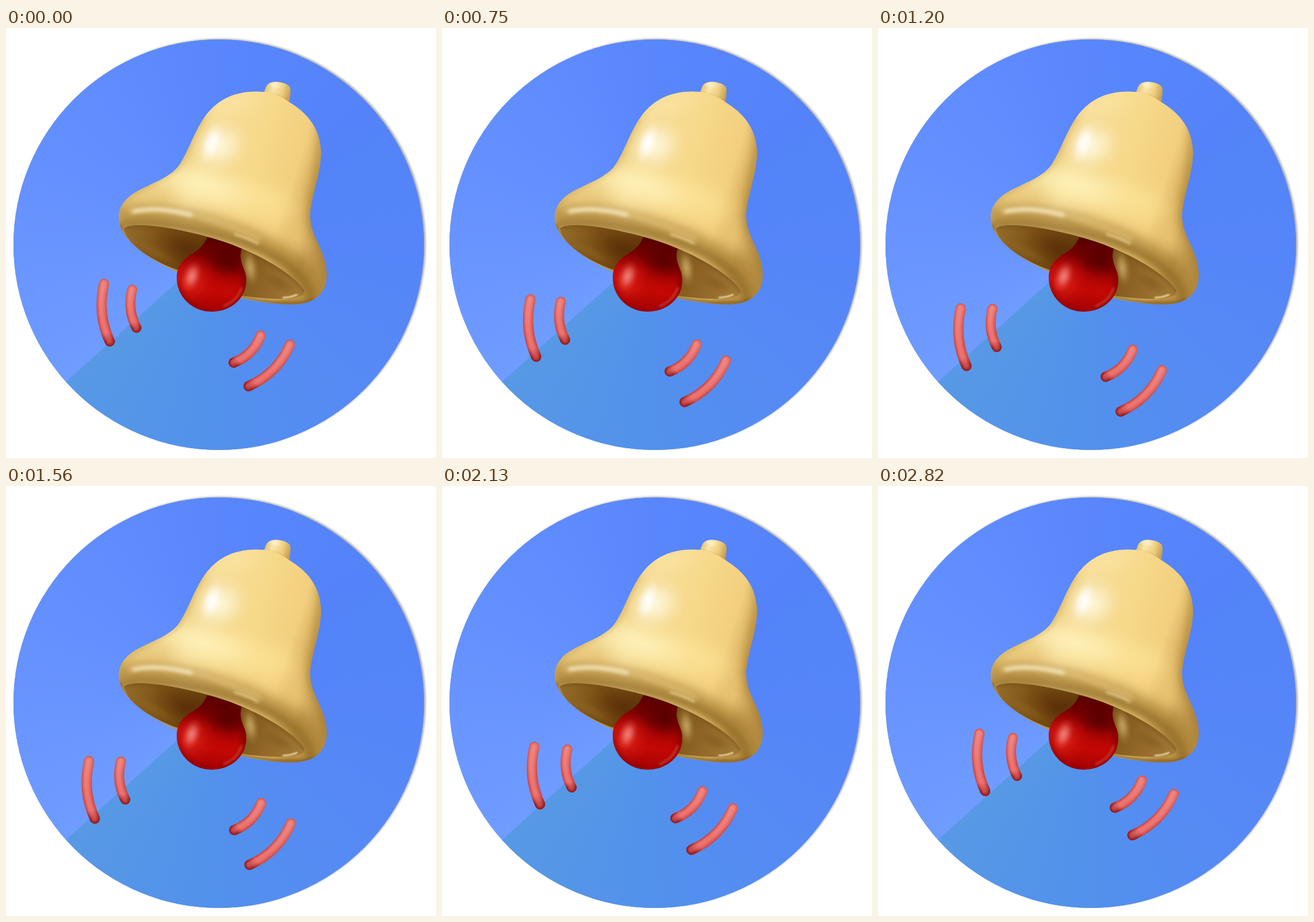
An HTML page with a canvas that plays this animation: 748x748 px, repeating every 2.85 s.

```html
<!DOCTYPE html>
<html lang="en">
<head>
<meta charset="utf-8">
<title>Ringing bell</title>
<style>
html, body { margin: 0; width: 100%; height: 100%; overflow: hidden; background: #fff; }
canvas { display: block; width: 748px; height: 748px; }
</style>
</head>
<body>
<canvas id="stage" width="748" height="748"></canvas>
<script>
const SIZE = 748, LOOP = 2850, STEP = 30;
const ctx = document.getElementById('stage').getContext('2d');
const scene = document.createElement('canvas');
scene.width = scene.height = SIZE;
const g = scene.getContext('2d');

const addStops = (grad, stops) => {
  stops.forEach(([at, color]) => grad.addColorStop(at, color));
  return grad;
};
const linear = (c, x0, y0, x1, y1, stops) =>
  addStops(c.createLinearGradient(x0, y0, x1, y1), stops);

// Soft elliptical spot that fades to nothing
function glow(x, y, rx, ry, deg, rgb, alpha) {
  g.save();
  g.translate(x, y);
  g.rotate(deg * Math.PI / 180);
  g.scale(rx, ry);
  g.fillStyle = addStops(g.createRadialGradient(0, 0, 0, 0, 0, 1), [
    [0, `rgba(${rgb},${alpha})`],
    [0.35, `rgba(${rgb},${alpha * 0.68})`],
    [0.7, `rgba(${rgb},${alpha * 0.2})`],
    [1, `rgba(${rgb},0)`]
  ]);
  g.fillRect(-1, -1, 2, 2);
  g.restore();
}

function softLine(d, width, color, blur) {
  g.save();
  g.filter = `blur(${blur}px)`;
  g.lineCap = 'round';
  g.lineWidth = width;
  g.strokeStyle = color;
  g.stroke(new Path2D(d));
  g.restore();
}

function clipped(path, draw) {
  g.save();
  g.clip(path);
  draw();
  g.restore();
}

function drawDisc() {
  g.fillStyle = '#fff';
  g.fillRect(0, 0, SIZE, SIZE);
  const disc = new Path2D();
  disc.arc(370, 377, 357, 0, 7);
  g.save();
  g.shadowColor = 'rgba(0,0,0,.32)';
  g.shadowBlur = 3.5;
  g.shadowOffsetX = 3;
  g.shadowOffsetY = -1.5;
  g.fillStyle = '#5585f9';
  g.fill(disc);
  g.restore();
  g.fillStyle = addStops(g.createConicGradient(Math.atan2(238, -265), 370, 377), [
    [0, '#6f9cff'], [0.12, '#6894ff'], [0.25, '#608dff'], [0.37, '#5986fc'],
    [0.5, '#5483f9'], [0.62, '#5585f9'], [0.75, '#568af4'],
    [0.87, '#5291ec'], [1, '#5799e4']
  ]);
  g.fill(disc);
}

function drawKnob() {
  const knob = new Path2D('M447 118 C452 105 452 97 462 94.5 C472 91.5 490 96 494 103 C497 110 493 120 493 134 Z');
  g.fillStyle = linear(g, 450, 105, 496, 118,
    [[0, '#e2c074'], [0.3, '#fbe5a8'], [0.65, '#efcf80'], [1, '#bf974a']]);
  g.fill(knob);
  clipped(knob, () => {
    glow(468, 99, 15, 8, 10, '255,247,215', 0.7);
    softLine('M448 117 Q472 114 494 134', 4, 'rgba(160,120,48,.45)', 2.5);
  });
}

function drawBody() {
  const body = new Path2D('M449 111 C400 107 365 124 342 160 C325 187 318 212 303 236 ' +
    'C290 257 262 267 240 278 C212 291 196 306 196 332 C197 362 236 397 297 424 L410 470 ' +
    'C445 478 475 481 500 481 C537 480 558 461 558 429 C557 385 530 367 529 327 ' +
    'C530 293 548 255 548 215 C546 173 524 148 493 129 C480 119 464 113 449 111 Z');
  g.fillStyle = linear(g, 310, 190, 556, 272,
    [[0, '#ebcc80'], [0.16, '#f6dd99'], [0.5, '#f7d98a'], [0.78, '#f1cf7e'],
     [0.92, '#d8b05e'], [1, '#bb9248']]);
  g.fill(body);
  clipped(body, () => {
    glow(400, 132, 75, 34, -18, '255,232,168', 0.4);
    glow(340, 272, 150, 46, 14, '255,242,185', 0.9);
    glow(460, 305, 85, 55, 28, '255,228,150', 0.6);
    glow(508, 365, 48, 62, -15, '238,202,120', 0.7);
    softLine('M549 170 C558 215 532 270 533 330 C538 368 560 385 562 440', 14, 'rgba(145,106,38,.55)', 8);
    softLine('M342 157 C322 190 318 214 300 240 C286 259 210 282 196 318', 6, 'rgba(190,150,70,.55)', 5);
    // Lip bands, following the tilt of the opening
    softLine('M196 330 C240 314 370 336 450 378 C505 406 538 440 548 475', 32, 'rgba(170,130,54,.75)', 10);
    softLine('M202 344 C250 330 370 355 440 384 C500 412 527 442 530 472', 15, 'rgba(141,105,38,.7)', 6);
    softLine('M216 319 C290 309 370 334 440 368', 8, 'rgba(240,212,140,.5)', 4);
    softLine('M222 319 C255 312 285 316 322 325', 5, 'rgba(255,247,218,.9)', 3);
    softLine('M398 359 C412 363 426 368 438 375', 3.5, 'rgba(255,235,178,.6)', 2);
    softLine('M197 345 C215 385 260 404 300 423 L410 468 C450 478 505 484 535 474', 7, 'rgba(125,88,28,.75)', 2.5);
    // Shoulder shine
    glow(372, 205, 55, 48, -35, '255,250,226', 0.85);
    glow(358, 200, 19, 38, 18, '255,255,255', 1);
  });
}

function drawInside() {
  const hole = new Path2D('M205 349 C220 335 295 348 350 363 C425 382 503 428 519 457 ' +
    'C523 474 465 474 412 466 L297 420 C260 407 210 379 205 349 Z');
  g.fillStyle = linear(g, 210, 345, 520, 462,
    [[0, '#946d2a'], [0.18, '#7c5216'], [0.42, '#643a0a'], [0.62, '#7c5418'],
     [0.82, '#94692a'], [1, '#a47d38']]);
  g.fill(hole);
  clipped(hole, () => {
    glow(315, 385, 65, 32, 24, '82,36,5', 0.6);
    glow(255, 388, 56, 13, 28, '150,106,40', 0.45);
    softLine('M206 346 C250 337 320 352 365 366 C430 386 500 427 520 458', 6, 'rgba(110,74,22,.6)', 3);
    glow(425, 417, 15, 34, -8, '213,181,111', 0.75);
    glow(475, 444, 38, 15, 24, '128,88,27', 0.6);
  });
  softLine('M482 469 Q496 468.5 506 464', 2.5, 'rgba(255,240,195,.85)', 1);
}

function drawClapper() {
  const clapper = new Path2D('M350 364 C370 369 390 375 410 384 C405 402 411 410 416 425 ' +
    'C426 463 396 493 358 493.5 C323 493 297 467 297 434 C297 414 309 401 325 392 ' +
    'C338 384 345 376 350 364 Z');
  g.fillStyle = linear(g, 372, 366, 350, 494,
    [[0, '#540000'], [0.24, '#760000'], [0.46, '#ae0403'], [0.7, '#c40804'], [1, '#a20202']]);
  g.fill(clapper);
  clipped(clapper, () => {
    glow(386, 406, 52, 40, 15, '84,0,0', 0.85);
    glow(322, 438, 42, 48, 12, '226,40,30', 0.65);
    glow(323, 432, 17, 28, 18, '255,178,168', 0.65);
    softLine('M413 422 C421 454 407 480 377 491', 7, 'rgba(105,0,0,.75)', 4);
    softLine('M410 452 C405 468 394 478 379 484', 2.5, 'rgba(255,112,91,.75)', 2);
    softLine('M298 442 C303 470 326 490 357 493', 5, 'rgba(126,0,0,.6)', 3);
  });
}

drawDisc();
drawKnob();
drawBody();
drawInside();
drawClapper();

// Marks: end points and bend of each arc, then offsets at each time in TIMES
const TIMES = [0, 1290, 1560, 1920, 2370, 2820];
const marks = [
  { arc: [170.5, 445, 158.5, 498, 180.5, 545], w: 18,
    x: [0, -28.5, -26, -16, -3.5, 6], y: [0, 46, 33.5, 17, 0, -14.5] },
  { arc: [219.5, 455, 210.5, 490, 227, 521.5], w: 17.5,
    x: [0, -22, -19.5, -7.5, 5, 15], y: [0, 36, 24, 10.5, -5, -17] },
  { arc: [443, 535, 430, 569, 396, 582], w: 18,
    x: [0, 0, 1, 7, 13, 16], y: [0, 26.5, 16.5, 3, -11.5, -22.5] },
  { arc: [494, 551, 472, 601, 422, 623], w: 18,
    x: [0, 0, 1.5, 8, 16, 20.5], y: [0, 47.5, 36, 19, 0, -15.5] }
];

function track(v, t) {
  const slope = i => (v[i + 1] - v[i]) / (TIMES[i + 1] - TIMES[i]);
  const last = TIMES.length - 1;
  if (t <= TIMES[1]) return slope(0) * t;
  if (t >= TIMES[last]) return v[last] + slope(last - 1) * (t - TIMES[last]);
  let i = 1;
  while (t >= TIMES[i + 1]) i++;
  const speed = k => k === 1 ? slope(0) : k === last ? slope(k - 1)
    : (slope(k - 1) + slope(k)) / 2;
  const h = TIMES[i + 1] - TIMES[i], u = (t - TIMES[i]) / h, r = 1 - u;
  return v[i] * r * r * (1 + 2 * u) + v[i + 1] * u * u * (3 - 2 * u)
    + h * u * r * (r * speed(i) - u * speed(i + 1));
}

function drawMark({ arc, w, x, y }, t) {
  const [x0, y0, cx, cy, x1, y1] = arc;
  const path = new Path2D(`M${x0} ${y0} Q${cx} ${cy} ${x1} ${y1}`);
  const layers = [
    [w, 0, '#cf5f5e', '#c64a4b', '#941c20'],
    [w - 4, 0, '#e16f6c', '#da5a59', '#a92c2f'],
    [w - 8, -0.4, '#ea7b77', '#e66967', '#bb4040'],
    [w - 12, -0.8, '#ef8580', '#ec746f', '#c84d4c']
  ];
  ctx.save();
  ctx.translate(track(x, t), track(y, t));
  ctx.lineCap = 'round';
  layers.forEach(([width, shift, top, mid, end]) => {
    ctx.save();
    ctx.translate(shift, shift);
    ctx.lineWidth = width;
    ctx.strokeStyle = linear(ctx, x0, y0, x1, y1,
      [[0, top], [0.65, mid], [0.85, mid], [1, end]]);
    ctx.stroke(path);
    ctx.restore();
  });
  ctx.restore();
}

function render(now) {
  const t = Math.floor((now % LOOP) / STEP) * STEP;
  ctx.drawImage(scene, 0, 0);
  marks.forEach(m => drawMark(m, t));
}

const start = performance.now();
function tick() {
  render(performance.now() - start);
  requestAnimationFrame(tick);
}
tick();
</script>
</body>
</html>
```
